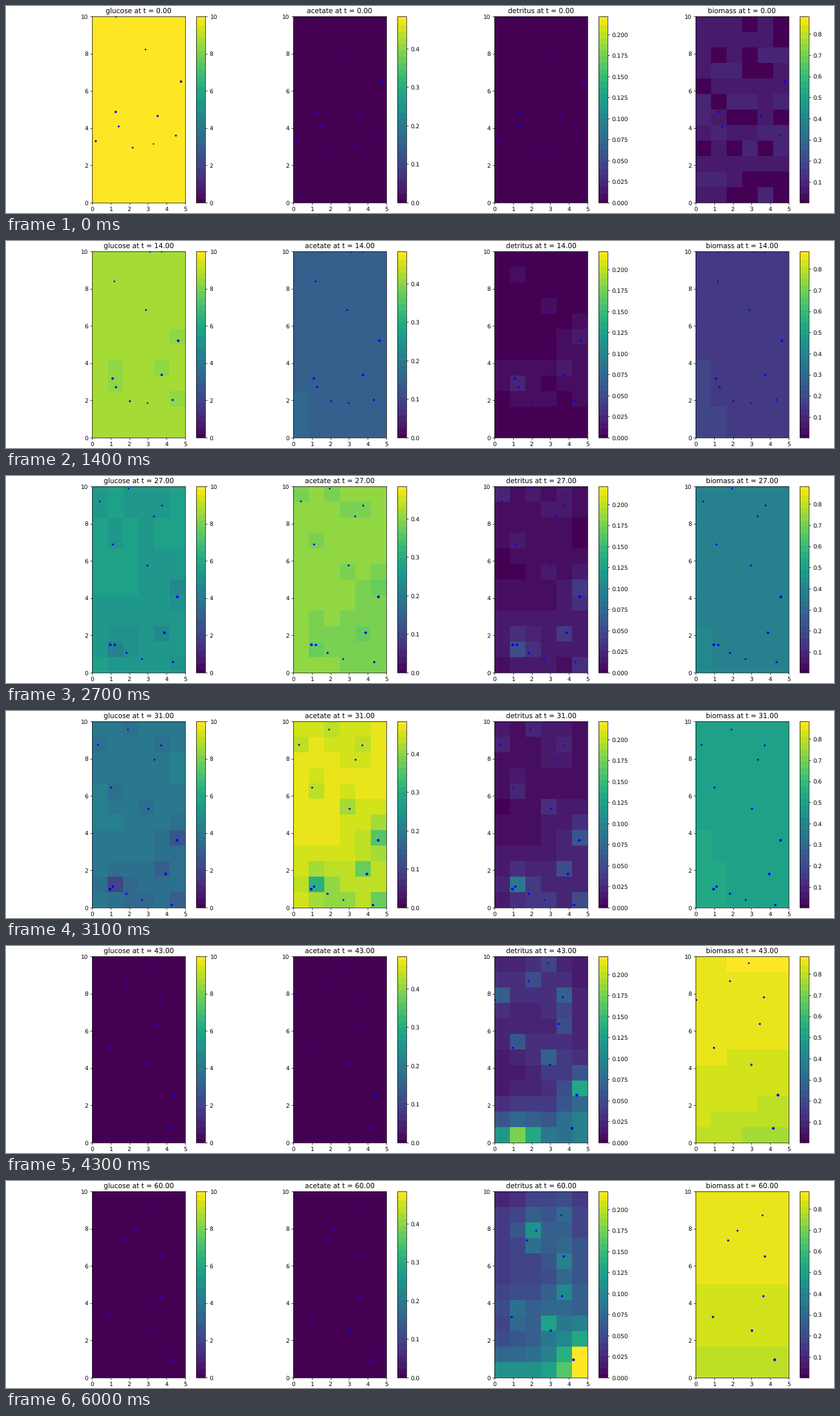
A matplotlib script for the animation above (6.1 s loop, 1280x320 px).

```python
import numpy as np
import matplotlib.pyplot as plt
from matplotlib.animation import FuncAnimation

FRAMES = 61
COLS, ROWS, WIDTH, HEIGHT = 6, 12, 5, 10
CELL = WIDTH / COLS
DPI = 64
SHADES = 31

rng = np.random.default_rng(4)
c, r = np.meshgrid(np.arange(COLS), np.arange(ROWS))

# ---- sinking particles ----
# present at the start, largest first: x, y, sideways speed, sinking speed
INITIAL = [
    (4.78, 6.50, -0.008, 0.092),
    (1.27, 4.87, -0.011, 0.125),
    (3.52, 4.65, 0.015, 0.090),
    (0.20, 3.30, -0.030, 0.090),
    (1.43, 4.09, -0.008, 0.097),
    (4.50, 3.60, -0.006, 0.112),
    (2.18, 2.95, -0.011, 0.071),
    (2.87, 8.22, 0.003, 0.094),
    (1.28, 9.97, -0.006, 0.113),
    (3.30, 3.15, -0.020, 0.091),
]
# entering at the surface: time, x, sideways speed, sinking speed
ARRIVALS = [
    (14, 3.15, 0.010, 0.123),
    (14, 3.70, 0.000, 0.077),
    (19, 0.50, -0.020, 0.100),
    (26, 1.90, -0.003, 0.076),
    (40, 3.00, -0.040, 0.105),
    (48, 3.40, 0.018, 0.107),
]
start = np.array([0] * len(INITIAL) + [a[0] for a in ARRIVALS])
x0, y0, vx, vy = np.array(INITIAL + [(x, HEIGHT, u, v)
                                     for _, x, u, v in ARRIVALS]).T
size = np.append(np.linspace(3.8, 2.2, len(INITIAL)),
                 np.full(len(ARRIVALS), 2.6))

jitter = np.zeros((FRAMES, 2, len(start)))
for n in range(1, FRAMES):
    jitter[n] = 0.7 * jitter[n - 1] + rng.normal(0, 0.03, jitter[n].shape)


def swarm(n):
    """x, y and diameter in pixels of every particle in the water."""
    age = n - start
    x = x0 + vx * age + jitter[n, 0]
    y = y0 - vy * age + jitter[n, 1]
    d = np.minimum(size + 0.02 * age, 4.3)
    inside = (age >= 0) & (x > -0.05) & (x < WIDTH + 0.05) & (y > -0.05)
    return x[inside], y[inside], d[inside]


# ---- biomass: grows until the food is gone, then thins out near the floor ----
saddle = (2.5 - c) * (8 - r) / 8
depth = np.sqrt(r + 0.2) - 2.387
inoculum = rng.choice([-0.045, 0, 0.04], size=c.shape, p=[0.3, 0.45, 0.25])


def population(n):
    return np.interp(n, (0, 7, 14, 23, 31, 35, 38, 60),
                     (0.052, 0.1, 0.158, 0.27, 0.511, 0.7215, 0.841, 0.84))


def biomass(n):
    lean = np.interp(n, (0, 14, 43, 60), (0, 0.005, 0.005, 0))
    thinning = np.interp(n, (35, 39, 43, 60), (0, 0.03, 0.031, 0.0268))
    return (population(n) + lean * saddle + thinning * depth
            + inoculum * np.exp(-n / 3))


# ---- detritus: shed by the particles, spreading and settling ----
def simulate(spread=0.08, settle=0.03):
    s = np.zeros(c.shape)
    out = [s]
    for n in range(1, FRAMES):
        p = np.pad(s, 1, mode="edge")
        s = s + spread * (p[:-2, 1:-1] + p[2:, 1:-1]
                          + p[1:-1, :-2] + p[1:-1, 2:] - 4 * s)
        falling = settle * s[1:]
        s[1:] -= falling
        s[:-1] += falling
        x, y, d = swarm(n)
        i = np.clip((y / CELL).astype(int), 0, ROWS - 1)
        j = np.clip((x / CELL).astype(int), 0, COLS - 1)
        np.add.at(s, (i, j), 0.018 * population(n) * d ** 2 / 12)
        out.append(s)
    return out


detritus = simulate()


# ---- dissolved substrates, used up faster where detritus collects ----
def glucose(n):
    base = np.interp(n, (0, 7, 14, 23, 31, 35, 38, 40),
                     (10, 9.45, 8.72, 7.0, 4.3, 2.25, 0.5, 0))
    return np.clip(base - 25 * detritus[n], 0, 10)


def acetate(n):
    base = np.interp(n, (0, 7, 14, 23, 31, 33, 35, 39),
                     (0, 0.055, 0.15, 0.326, 0.48, 0.46, 0.39, 0))
    uptake = np.interp(n, (25, 31, 35), (0, 2, 7))
    return np.clip(base + 0.002 * saddle - uptake * detritus[n], 0, 0.484)


# ---- figure: name, field, range, colour bar step ----
FIELDS = [
    ("glucose", glucose, 0, 10, 2),
    ("acetate", acetate, 0, 0.484, 0.1),
    ("detritus", lambda n: detritus[n], 0, 0.2215, 0.025),
    ("biomass", biomass, 0.002, 0.884, 0.1),
]

plt.rcParams["font.family"] = "DejaVu Sans"
plt.rcParams["text.hinting"] = "none"
fig = plt.figure(figsize=(20, 5), dpi=DPI, facecolor="white")
cmap = plt.get_cmap("viridis", SHADES)


def pixel_axes(left, width):
    return fig.add_axes([left / 1280, 16 / 320, width / 1280, 288 / 320])


panels = []
for k, (name, field, lo, hi, step) in enumerate(FIELDS):
    left = 133 + 311 * k
    half = (hi - lo) / (SHADES - 1) / 2
    ax = pixel_axes(left, 144)
    mesh = ax.pcolormesh(np.linspace(0, WIDTH, COLS + 1),
                         np.linspace(0, HEIGHT, ROWS + 1),
                         field(0), cmap=cmap, vmin=lo - half, vmax=hi + half)
    dots = ax.scatter([], [], color="blue", linewidths=0, zorder=2)
    ax.set(xlim=(0, WIDTH), ylim=(0, HEIGHT),
           xticks=range(WIDTH + 1), yticks=range(0, HEIGHT + 1, 2))
    title = ax.set_title("")
    bar = fig.colorbar(mesh, cax=pixel_axes(left + 161, 14.4),
                       ticks=np.arange(0, hi + step / 10, step))
    bar.ax.set_ylim(lo, hi)
    panels.append((name, field, mesh, dots, title))


def update(n):
    x, y, d = swarm(n)
    for name, field, mesh, dots, title in panels:
        mesh.set_array(field(n))
        dots.set_offsets(np.column_stack([x, y]))
        dots.set_sizes((d * 72 / DPI) ** 2)
        title.set_text(f"{name} at t = {n:.2f}")
    return []


anim = FuncAnimation(fig, update, frames=FRAMES, interval=100,
                     repeat=True, repeat_delay=0)
plt.show()
```
